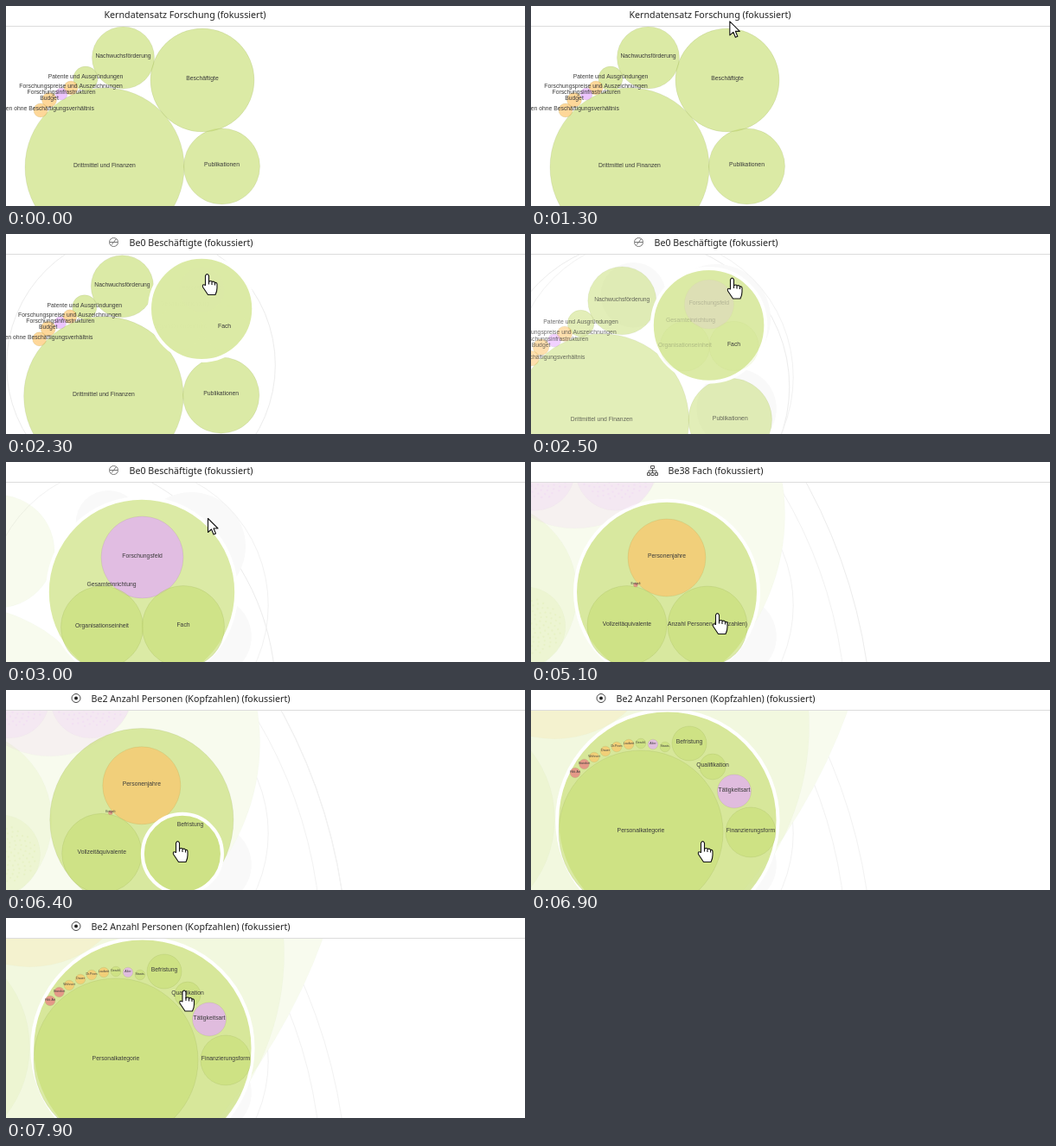
Animation of 600x232 px, one loop 8000 ms. Source, as an HTML page with a canvas:

```html
<!DOCTYPE html>
<html lang="de">
<head>
<meta charset="utf-8">
<title>Zoombare Kreispackung</title>
<style>
  html, body { margin: 0; width: 100%; height: 100%; overflow: hidden; background: #fff; }
  canvas { display: block; }
</style>
</head>
<body>
<canvas id="stage" width="600" height="232"></canvas>
<script>
const ctx = document.getElementById('stage').getContext('2d');
const LOOP = 8000, STEP = 100, CX = 157, CY = 151, SIZE = 310, FILL = 0.68, FADED = 0.19;
const GREEN = '#cae07b', PURPLE = '#e5a9ff', ORANGE = '#fec469', RED = '#eb7480';

// One view per zoom level: centre and scale
const views = [
  { x: 157, y: 151, k: 1 },
  { x: 227, y: 86, k: 1.82 },
  { x: 253.37, y: 108.05, k: 4.06 },
  { x: 264.87, y: 117.65, k: 11.27 }
];
const zooms = [
  { click: 2300, lead: 100, length: 750 },
  { click: 4300, lead: 231, length: 600 },
  { click: 6400, lead: 40, length: 540 }
];
const titles = [
  ['Kerndatensatz Forschung (fokussiert)', 114],
  ['Be0 Beschäftigte (fokussiert)', 143],
  ['Be38 Fach (fokussiert)', 159],
  ['Be2 Anzahl Personen (Kopfzahlen) (fokussiert)', 99]
];

const nodes = [];
const root = { x: 157, y: 151, r: 155, depth: 0, parent: null };

// Places a circle by its position on screen while its parent is in focus
function add(parent, label, x, y, r, color = GREEN, extra = {}) {
  const v = views[parent.depth];
  const node = {
    parent, label, color, depth: parent.depth + 1,
    x: v.x + (x - CX) / v.k, y: v.y + (y - CY) / v.k, r: r / v.k, ...extra
  };
  nodes.push(node);
  return node;
}

add(root, 'Drittmittel und Finanzen', 114, 187, 92);
const juniors = add(root, 'Nachwuchsförderung', 135.5, 60, 36);
const papers = add(root, 'Publikationen', 249.5, 186, 44);
add(root, 'Patente und Ausgründungen', 92, 84, 14);
add(root, 'Forschungspreise und Auszeichnungen', 75, 95, 8, ORANGE);
add(root, 'Forschungsinfrastrukturen', 64, 102, 7, PURPLE);
add(root, 'Budget', 50, 109, 8.5, ORANGE);
add(root, 'Personen ohne Beschäftigungsverhältnis', 40, 121, 8, ORANGE);
const staff = add(root, 'Beschäftigte', 227, 86, 60);

const field = add(staff, 'Forschungsfeld', 157.5, 110.5, 47.5, PURPLE);
const unit = add(staff, 'Organisationseinheit', 111, 191.5, 47.5);
add(staff, 'Gesamteinrichtung', 122, 143.5, 0.8);
const subject = add(staff, 'Fach', 205, 191, 47.5, GREEN, { hero: true });

for (const [owner, color] of [[field, PURPLE], [unit, GREEN]]) {
  const dx = (owner.x - views[2].x) * views[2].k, dy = (owner.y - views[2].y) * views[2].k;
  if (owner === unit) add(owner, '', 157 + dx, 111 + dy, 45, ORANGE, { grain: true });
  for (const side of [-46.5, 46.5]) add(owner, '', 157 + dx + side, 190 + dy, 46, color, { grain: true });
}

add(subject, 'Personenjahre', 157, 111, 45, ORANGE);
add(subject, 'Vollzeitäquivalente', 111, 189.5, 46);
add(subject, 'Entgelt', 121, 142.5, 2.5, RED, { small: true });
const heads = add(subject, 'Anzahl Personen (Kopfzahlen)', 204, 190, 46, GREEN, { hero: true });

add(heads, 'Personalkategorie', 127, 165, 95);
add(heads, 'Befristung', 183, 62, 20, GREEN, { hero: true });
add(heads, 'Qualifikation', 210, 89, 15);
add(heads, 'Tätigkeitsart', 235, 117.5, 19.5, PURPLE);
add(heads, 'Finanzierungsform', 254, 165, 29);
[
  ['Hbk.Art', 51, 96, RED], ['Standort', 61.5, 86, RED], ['Wohnort', 73, 78, ORANGE],
  ['Dauer', 86, 71, ORANGE], ['Dr.Prom', 99, 66, ORANGE], ['Laufzeit', 113, 63, ORANGE],
  ['Geschl.', 127, 62, GREEN], ['Alter', 141, 63, PURPLE], ['Staats.', 155, 66, GREEN]
].forEach(([label, x, y, color]) => add(heads, label, x, y, 5.8, color, { small: true }));

const path = [root, staff, subject, heads];

const mix = (a, b, p) => a + (b - a) * p;
const easeCubic = t => t < 0.5 ? 4 * t ** 3 : 1 - 4 * (1 - t) ** 3;

function inside(node, ancestor) {
  for (; node; node = node.parent) if (node === ancestor) return true;
  return false;
}

// Smooth pan and zoom after van Wijk and Nuij
function interpolateView(a, b, p) {
  const w0 = SIZE / a.k, w1 = SIZE / b.k, dx = b.x - a.x, dy = b.y - a.y;
  const d = Math.hypot(dx, dy), grow = w1 * w1 - w0 * w0;
  const r0 = -Math.asinh((grow + 4 * d * d) / (4 * w0 * d));
  const r1 = -Math.asinh((grow - 4 * d * d) / (4 * w1 * d));
  const s = mix(r0, r1, p);
  const u = w0 / (2 * d) * (Math.cosh(r0) * Math.tanh(s) - Math.sinh(r0));
  return { x: a.x + u * dx, y: a.y + u * dy, k: a.k * Math.cosh(s) / Math.cosh(r0) };
}

function stateAt(t) {
  const level = zooms.filter(z => t >= z.click).length;
  if (!level) return { level, p: 1, view: views[0] };
  const z = zooms[level - 1];
  const p = easeCubic(Math.min(1, (t - z.click + z.lead) / z.length));
  return { level, p, view: interpolateView(views[level - 1], views[level], p) };
}

const project = (n, v) => [CX + (n.x - v.x) * v.k, CY + (n.y - v.y) * v.k, n.r * v.k];

function circle(x, y, r, fill, stroke, width = 1) {
  ctx.beginPath();
  ctx.arc(x, y, r, 0, 7);
  if (fill) { ctx.fillStyle = fill; ctx.fill(); }
  if (stroke) { ctx.strokeStyle = stroke; ctx.lineWidth = width; ctx.stroke(); }
}

function nodeAlpha(node, level) {
  if (node.depth > level + 1) return 0;
  return inside(node, path[level]) ? 1 : FADED;
}

function labelAlpha(node, { level, p }) {
  if (node === path[level]) return 0;
  const now = node.parent === path[level];
  if (now && node.hero) return 1;
  const before = level > 0 && node.parent === path[level - 1];
  return mix(+before, +now, p);
}

// Faint remains of earlier zoom steps, hidden behind the staff circle
function drawTraces(t, view) {
  if (t > 2450) {
    const early = stateAt(2450).view;
    for (const n of [staff, juniors, papers]) circle(...project(n, early), '#f9f9f9');
  }
  for (const past of [2450, 4450, 6300]) {
    if (t > past) circle(...project(root, stateAt(past).view), null, '#f2f2f2');
  }
  circle(...project(staff, view), '#fff');
}

function drawGrain(x, y, r, color) {
  for (let i = 1; i < 140; i++) {
    const d = r * 0.92 * Math.sqrt(i / 140), a = i * 2.4;
    circle(x + d * Math.cos(a), y + d * Math.sin(a) * 0.8, r * 0.025, color);
  }
}

function drawNodes({ level, p, view }) {
  for (const n of nodes) {
    const alpha = mix(nodeAlpha(n, Math.max(0, level - 1)), nodeAlpha(n, level), p);
    if (!alpha) continue;
    const [x, y, r] = project(n, view);
    ctx.globalAlpha = alpha * FILL;
    circle(x, y, r, n.color);
    if (n.grain) drawGrain(x, y, r, n.color);
    ctx.globalAlpha = alpha;
    if (level && n === path[level]) circle(x, y, r, null, '#fff', 4);
    else circle(x, y, r, null, 'rgba(90,110,30,.13)', 0.8);
  }
}

function drawLabels(state) {
  ctx.textAlign = 'center';
  ctx.textBaseline = 'middle';
  ctx.fillStyle = '#3a3a3a';
  for (const n of nodes) {
    ctx.globalAlpha = labelAlpha(n, state);
    if (!n.label || !ctx.globalAlpha) continue;
    const [x, y] = project(n, state.view);
    ctx.font = `${n.small ? 3.6 : 6.8}px "Liberation Sans", Arial, sans-serif`;
    ctx.fillText(n.label, x, y - 1.5);
  }
  ctx.globalAlpha = 1;
}

function drawIcon(level) {
  ctx.lineWidth = 1;
  if (level === 1) {
    circle(124.5, 9.5, 5, null, '#777');
    ctx.stroke(new Path2D('M120 9.5H129M124.5 9.5L127 6M124.5 9.5L122 12.5'));
  } else if (level === 2) {
    ctx.strokeStyle = '#555';
    ctx.stroke(new Path2D('M138.5 4.5h4v3h-4zM134.5 12.5h3v3h-3zM139 12.5h3v3h-3zM143.5 12.5h3v3h-3zM140.5 7.5v5M136 12.5v-2.5h9v2.5'));
  } else if (level === 3) {
    circle(81, 9.5, 5, null, '#444');
    circle(81, 9.5, 2, '#222');
  }
}

function drawHeader(level) {
  ctx.fillStyle = '#fff';
  ctx.fillRect(0, 0, 600, 23);
  ctx.fillStyle = '#dcdcdc';
  ctx.fillRect(0, 23, 600, 1);
  ctx.fillStyle = '#222';
  ctx.textAlign = 'left';
  ctx.textBaseline = 'alphabetic';
  ctx.font = '10.67px "Noto Sans", "Open Sans", sans-serif';
  ctx.fillText(titles[level][0], titles[level][1] - 0.5, 14);
  drawIcon(level);
}

// Pointer tip: time, x, y
const pointerKeys = [
  [1000, 228, -30], [1100, 228, 0], [1400, 230, 26], [1800, 233, 47], [2400, 233, 47],
  [2800, 233, 65], [3000, 233, 65], [3100, 232, 97], [3700, 216, 178], [4200, 216, 178],
  [4300, 218, 178], [4900, 218, 178], [5000, 215, 176], [5100, 216, 176], [5200, 216, 176],
  [5800, 199, 176], [7200, 199, 176], [7400, 191, 165], [7900, 206.5, 84.5], [8000, 206.5, 84.5]
];
const hand = new Path2D('M-2 2Q0 -2 2 2V9Q4 7 6 9Q8 8 9 10Q11.500 9.500 11.500 12V16Q11.500 20 9.500 24H1L-5 15Q-6 11 -2 13Z');
const handLines = new Path2D('M2 8V12M5.500 9V12.500M9 10V13');
const arrow = new Path2D('M0 0V16L4 12.500L6.500 18.500L9 17.500L6.500 11.500H11.500Z');

function drawPointer(t) {
  if (t < 1100) return;
  const i = pointerKeys.findIndex(key => key[0] >= t);
  const [t0, x0, y0] = pointerKeys[i - 1], [t1, x1, y1] = pointerKeys[i];
  const p = (t - t0) / (t1 - t0);
  const isArrow = t < 1400 || (t >= 2700 && t < 3200);
  const nudge = isArrow ? 0.5 : -0.5;
  ctx.save();
  ctx.translate(mix(x0, x1, p) + nudge, mix(y0, y1, p) + nudge);
  ctx.fillStyle = '#fff';
  ctx.strokeStyle = '#111';
  ctx.lineWidth = 1.1;
  ctx.lineJoin = 'round';
  const shape = isArrow ? arrow : hand;
  ctx.fill(shape);
  ctx.stroke(shape);
  if (!isArrow) ctx.stroke(handLines);
  ctx.restore();
}

function draw(now) {
  const t = Math.floor(now % LOOP / STEP) * STEP;
  const state = stateAt(t);
  ctx.globalAlpha = 1;
  ctx.fillStyle = '#fff';
  ctx.fillRect(0, 0, 600, 232);
  if (state.level) circle(...project(root, state.view), null, '#ececec');
  drawTraces(t, state.view);
  drawNodes(state);
  drawLabels(state);
  drawHeader(state.level);
  drawPointer(t);
}

const start = performance.now();
function frame() {
  draw(performance.now() - start);
  requestAnimationFrame(frame);
}
frame();
</script>
</body>
</html>
```
